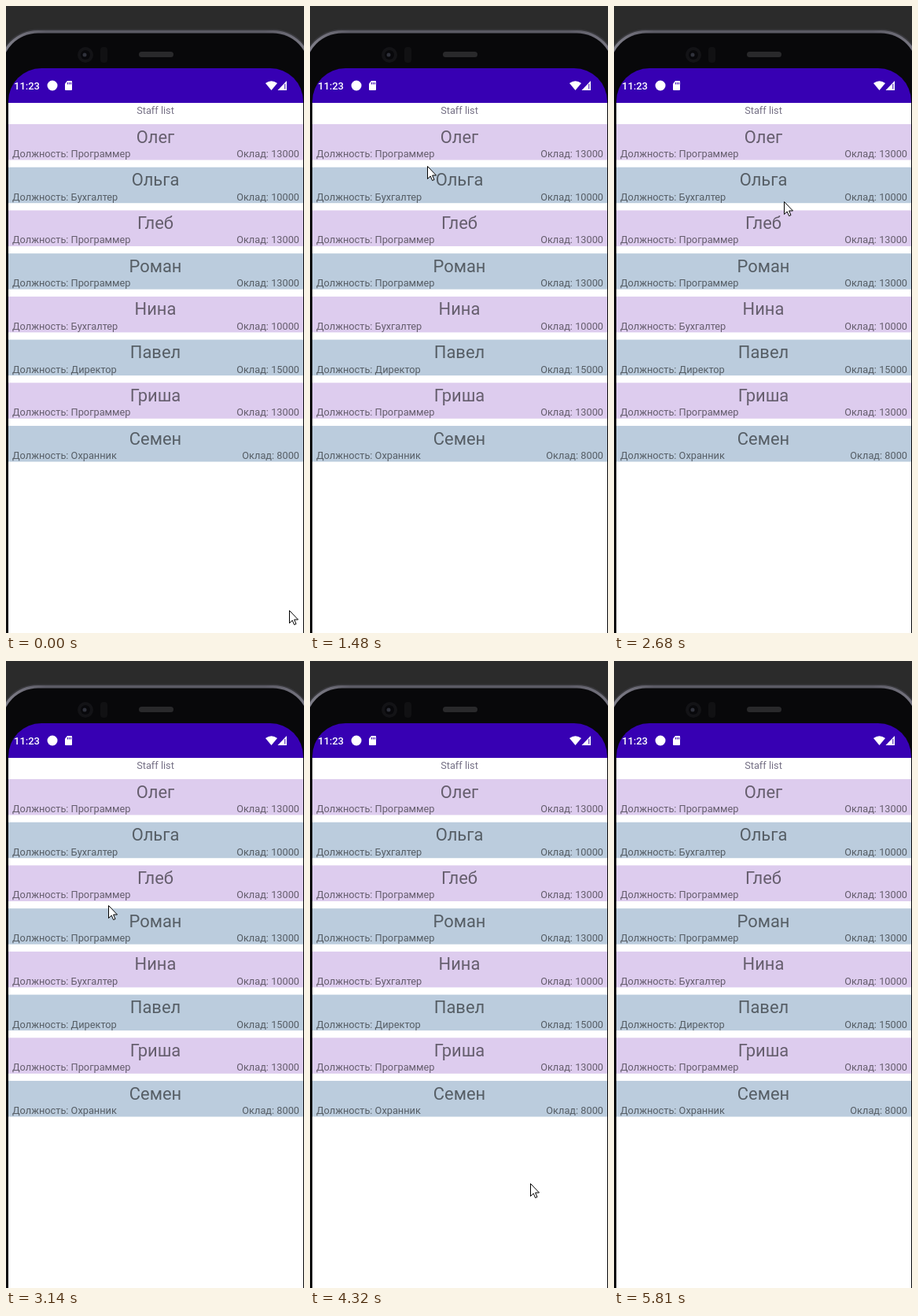
Write an HTML page that moves like this. It is 379x796 px and loops after 6.41 s.

```html
<!DOCTYPE html>
<html lang="ru">
<head>
<meta charset="utf-8">
<title>Staff list</title>
<style>
  html, body { margin: 0; width: 100%; height: 100%; overflow: hidden; background: #2b2b2b; }
  svg { display: block; font: 12.77px Roboto, sans-serif; }
  #rows text { fill: rgba(0, 0, 0, .54); }
  #rows .name { font-size: 21.9px; text-anchor: middle; }
  #rows .pay { text-anchor: end; }
</style>
</head>
<body>
<svg width="379" height="796" viewBox="0 0 379 796">
  <defs>
    <linearGradient id="rim">
      <stop offset="0" stop-color="#85848f"/>
      <stop offset=".15" stop-color="#5b5a64"/>
      <stop offset=".85" stop-color="#5b5a64"/>
      <stop offset="1" stop-color="#7b7a85"/>
    </linearGradient>
  </defs>

  <!-- phone body -->
  <rect x="-10" y="29.5" width="400" height="900" rx="50" fill="#39393d"/>
  <rect x="-8.500" y="31" width="397" height="900" rx="49" fill="url(#rim)"/>
  <rect x="-5.500" y="34.500" width="391" height="900" rx="46" fill="#08080a"/>
  <circle cx="101" cy="62" r="10" fill="#131316"/>
  <circle cx="101" cy="62" r="6" fill="#08080b"/>
  <circle cx="100" cy="62" r="2.500" fill="#30323c"/>
  <rect x="120" y="52" width="9" height="20" rx="4" fill="#111113"/>
  <rect x="169" y="58" width="44" height="7" rx="3.500" fill="#29292b"/>

  <!-- screen -->
  <rect x="3" y="79" width="375" height="90" rx="42" fill="#3700b3"/>
  <rect x="3" y="123" width="375" height="673" fill="#fff"/>
  <g fill="#fff">
    <text x="10" y="106" font-size="13" font-weight="500">11:23</text>
    <circle cx="59" cy="101" r="6.500"/>
    <path d="M78 95H83Q84 95 84 96V106Q84 107 83 107H76Q75 107 75 106V98.500Z"/>
    <path d="M330 98Q337.500 92.500 345 98L337.500 107Z"/>
    <path d="M357 95V107H345.500Z"/>
  </g>
  <path d="M78.500 97v2.500M80.500 97v2.500M82.500 97v2.500M354.800 99v6.500" stroke="#3700b3"/>
  <text x="190" y="137" text-anchor="middle" fill="#757085">Staff list</text>
  <g id="rows"></g>

  <circle id="click" cx="177" cy="174" r="15" fill="#ff0" fill-opacity=".47"/>
  <path id="cursor" d="M.5.5V16.500L4.200 13L6.600 18.500L9 17.500L6.600 12H11.500Z" fill="#fff" stroke="#000"/>
</svg>
<script>
const LOOP = 6410;
const CIRCLE_START = 1150, CIRCLE_END = 2460;
const byId = id => document.getElementById(id);

const pay = { Программер: 13000, Бухгалтер: 10000, Директор: 15000, Охранник: 8000 };
const staff = [
  ['Олег', 'Программер'], ['Ольга', 'Бухгалтер'], ['Глеб', 'Программер'], ['Роман', 'Программер'],
  ['Нина', 'Бухгалтер'], ['Павел', 'Директор'], ['Гриша', 'Программер'], ['Семен', 'Охранник']
];
byId('rows').innerHTML = staff.map(([name, job], i) => {
  const y = 150 + i * 54.72;
  return `<rect x="3" y="${y}" width="375" height="45.5" fill="${i % 2 ? '#bcd' : '#dce'}"/>
    <text class="name" x="190" y="${y + 23.5}">${name}</text>
    <text x="8" y="${y + 42}">Должность: ${job}</text>
    <text class="pay" x="373" y="${y + 42}">Оклад: ${pay[job]}</text>`;
}).join('');

// Key points of the pointer: [time, x, y]
const arrive = [[0, 360, 767], [610, 177, 174]];
const descend = [[CIRCLE_END, 251, 255], [2680, 216, 248], [3080, 137, 288],
  [3550, 111, 510], [4160, 245, 664], [4630, 322, 632]];
const leave = [[4800, 322, 632], [5160, 287, 315], [5450, 187, 176], [5560, 122, 174], [5810, 392, 790]];

// Velocity at a point; paths start and end at rest.
function slope(pts, i, k) {
  const a = pts[i - 1], b = pts[i + 1];
  return a && b ? (b[k] - a[k]) / (b[0] - a[0]) : 0;
}

function along(pts, t) {
  const last = pts[pts.length - 1];
  if (t >= last[0]) return last.slice(1);
  const i = pts.findIndex(p => p[0] > t) - 1;
  const a = pts[i], b = pts[i + 1], d = b[0] - a[0], u = (t - a[0]) / d;
  const h = u * u * (3 - 2 * u);
  return [1, 2].map(k => a[k] + (b[k] - a[k]) * h
    + d * u * (1 - u) * ((1 - u) * slope(pts, i, k) - u * slope(pts, i + 1, k)));
}

// Widening, quickening loops that sink down the list
function circle(f) {
  const angle = 11.2 * f ** 1.5;
  return [177 + 15 * f - (30 + 30 * f * f) * Math.sin(angle),
    207 + 55 * f ** 3 - 33 * Math.cos(angle)];
}

function pointer(t) {
  if (t < CIRCLE_START) return along(arrive, t);
  if (t < CIRCLE_END) return circle((t - CIRCLE_START) / (CIRCLE_END - CIRCLE_START));
  return along(t < leave[0][0] ? descend : leave, t);
}

function draw(now) {
  const t = now % LOOP;
  const [x, y] = pointer(t).map(Math.round);
  byId('cursor').setAttribute('transform', `translate(${x} ${y})`);
  byId('click').style.display = t >= 750 && t < 810 ? '' : 'none';
}

const start = performance.now();
function tick() {
  draw(performance.now() - start);
  requestAnimationFrame(tick);
}
tick();
</script>
</body>
</html>
```
